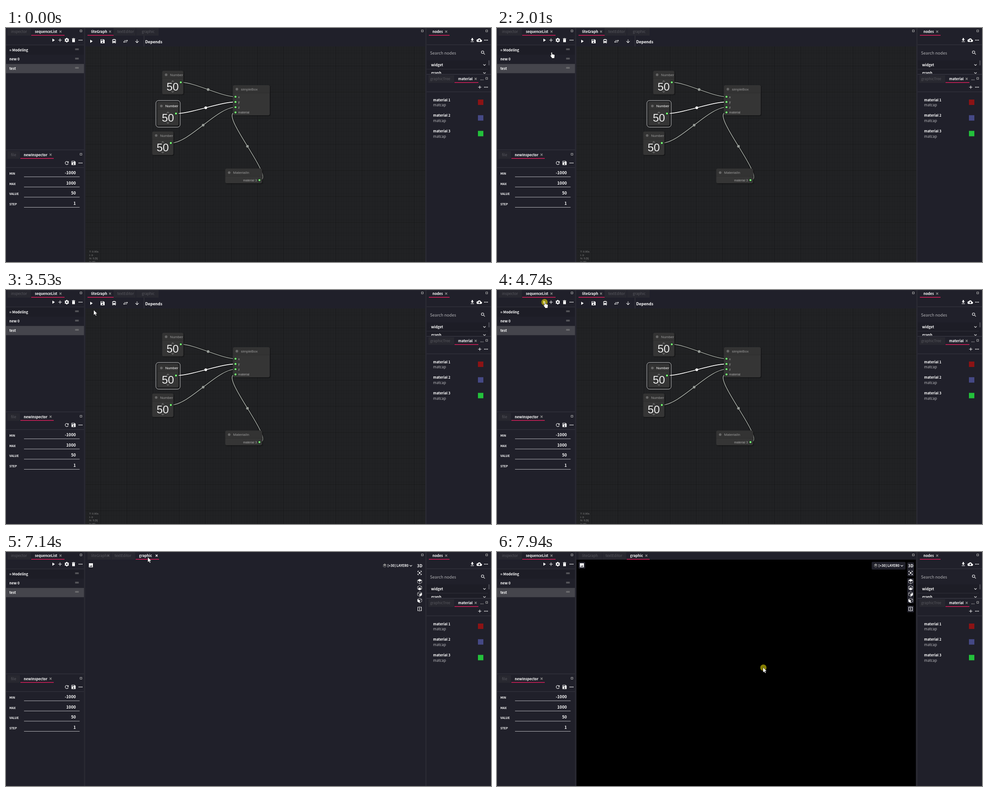
An HTML page with a canvas for the animation above (8 s loop, 1077 by 520 pixels).

```html
<!DOCTYPE html>
<html lang="en">
<head>
<meta charset="utf-8">
<title>Node editor</title>
<style>
html, body { margin: 0; width: 100%; height: 100%; overflow: hidden; background: #20202a; }
canvas { display: block; }
</style>
</head>
<body>
<canvas id="stage" width="1077" height="520"></canvas>
<script>
const ctx = document.getElementById('stage').getContext('2d');
const LOOP = 8000, SWITCH = 7080, LOADED = 7300;
const UI = '"Noto Sans CJK KR", "Noto Sans CJK JP", "Noto Sans CJK SC", "Noto Sans CJK", "Noto Sans", sans-serif';
const ARIAL = '"Liberation Sans", Arial, sans-serif';
const PANEL = '#20202a', TAB = '#282830', LINE = '#30303a', PINK = '#dc1e5c', DIM = '#58585e';
const K = 0.58; // graph units to pixels

const ICONS = {
  play: 'M8 5v14l11-7z',
  plus: 'M5 11h6V5h2v6h6v2h-6v6h-2v-6H5z',
  trash: 'M6 7h12v14H6zM5 4h4l1-1h4l1 1h4v2H5z',
  save: 'M3 3h14l4 4v14H3zM5 5h10v4H5zM9 16a3 3 0 1 0 6 0a3 3 0 1 0-6 0z',
  refresh: 'M17.6 6.4A8 8 0 1 0 19.7 14h-2.1A6 6 0 1 1 16.2 7.8L13 11h7V4z',
  search: 'M3 9.5a6.5 6.5 0 1 0 13 0a6.5 6.5 0 1 0-13 0zM5 9.5a4.5 4.5 0 1 0 9 0a4.5 4.5 0 1 0-9 0zM14 15.4l1.4-1.4 5 5-1.4 1.5z',
  down: 'M11 4h2v12l5.6-5.6L20 12l-8 8-8-8 1.4-1.4L11 16z',
  bus: 'M4 6q0-4 8-4t8 4v12l-2 3h-2v-2H8v2H6l-2-3zM6 6h12v5H6zM6 14h3v3H6zM15 14h3v3h-3z',
  swap: 'M6 11L2 15l4 4v-3h12v-2H6zM22 9l-4-4v3H6v2h12v3z',
  download: 'M9 3h6v6h4l-7 7-7-7h4zM5 18h14v2H5z',
  cloud: 'M6 20a6 6 0 0 1-.6-12A7.5 7.5 0 0 1 19.4 10A5 5 0 0 1 19 20zM17 13h-3V9h-4v4H7l5 5z',
  chevron: 'M6 10l1.4-1.4L12 13.2l4.6-4.6L18 10l-6 6z',
  image: 'M3 3h18v18H3zM5 18h14l-4.5-6-3.5 4.5-2.5-3z',
  drag: 'M4 9h16v2H4zM4 13h16v2H4z',
  dots: 'M3.500 12a2.200 2.200 0 1 0 4.400 0a2.200 2.200 0 1 0-4.400 0zM9.800 12a2.200 2.200 0 1 0 4.400 0a2.200 2.200 0 1 0-4.400 0zM16.100 12a2.200 2.200 0 1 0 4.400 0a2.200 2.200 0 1 0-4.400 0z',
  layers: 'M12 2l9 7-9 7-9-7zM3 13l9 7 9-7v3l-9 6-9-6z',
  focus: 'M3 3h6v2H5v4H3zM15 3h6v6h-2V5h-4zM3 15h2v4h4v2H3zM19 15h2v6h-6v-2h4zM8 12a4 4 0 1 0 8 0a4 4 0 1 0-8 0z',
  mirror: 'M11 1h2v22h-2zM3 3h6v2H5v14h4v2H3zM15 3h6v18h-6v-2h4V5h-4z'
};
for (const name in ICONS) ICONS[name] = new Path2D(ICONS[name]);
const ARROW = new Path2D('M0 0v17l4-4 3 6.500 2.500-1-3-6.500h5.500z');
const HAND = new Path2D('M4 1q1.500-1.500 3 0v6l7 1.500q2 .5 2 3l-1 7v2.500H6v-2L1 12.500q-.5-2 2-1.500l1 1z');

// pointer keys: time, x, y
const TRACK = [
  [810, 644, 489], [1230, 330, 187], [1380, 332, 187], [2010, 120, 54],
  [2160, 104, 63], [2340, 103, 84], [2800, 103, 84], [3040, 16, 94],
  [3160, 20, 92], [3530, 195, 45], [3590, 172, 31], [3900, 100, 7],
  [4100, 87, 20], [4430, 105, 27], [5870, 105, 27], [6170, 277, 92],
  [6400, 306, 60], [6620, 307, 21], [6680, 307, 21], [6900, 315, 12],
  [7300, 315, 12], [7860, 591, 257], [8000, 591, 257]
];
const CLICKS = [[4620, 5190], [6840, 7080], [7880, 8000]];

function box(x, y, w, h, color) {
  ctx.fillStyle = color;
  ctx.fillRect(x, y, w, h);
}

function text(s, x, y, size, color = '#fff', weight = 'bold', align = 'left', family = UI) {
  ctx.font = `${weight} ${size}px ${family}`;
  ctx.fillStyle = color;
  ctx.textAlign = align;
  ctx.fillText(s, x, y);
}

function icon(name, x, y, size = 12, color = '#fff') {
  ctx.save();
  ctx.translate(x - size / 2, y - size / 2);
  ctx.scale(size / 24, size / 24);
  ctx.fillStyle = color;
  ctx.fill(ICONS[name], 'evenodd');
  ctx.restore();
}

function disc(x, y, r, color) {
  ctx.beginPath();
  ctx.arc(x, y, r, 0, 7);
  ctx.fillStyle = color;
  ctx.fill();
}

function polygon(points, color) {
  ctx.beginPath();
  points.forEach(p => ctx.lineTo(...p));
  ctx.closePath();
  ctx.fillStyle = color;
  ctx.fill();
}

function gear(x, y) {
  ctx.strokeStyle = '#fff';
  ctx.lineWidth = 2.2;
  ctx.beginPath();
  ctx.arc(x, y, 2.8, 0, 7);
  ctx.stroke();
  for (let i = 0; i < 6; i++) {
    const a = i * Math.PI / 3 + Math.PI / 6, c = Math.cos(a), s = Math.sin(a);
    ctx.beginPath();
    ctx.moveTo(x + 3 * c, y + 3 * s);
    ctx.lineTo(x + 5 * c, y + 5 * s);
    ctx.stroke();
  }
}

function cross(x, y, color = '#888') {
  ctx.strokeStyle = color;
  ctx.lineWidth = 1.4;
  ctx.beginPath();
  ctx.moveTo(x - 2.2, y - 2.2);
  ctx.lineTo(x + 2.2, y + 2.2);
  ctx.moveTo(x + 2.2, y - 2.2);
  ctx.lineTo(x - 2.2, y + 2.2);
  ctx.stroke();
}

function maximize(x, y) {
  ctx.strokeStyle = '#aaa';
  ctx.lineWidth = 1;
  ctx.strokeRect(x - 2, y - 2, 4, 4);
}

function idleTab(label, x, w, textX, y = 0) {
  box(x, y, w, 17, TAB);
  text(label, textX, y + 11, 8.1, DIM, 'normal');
}

function activeTab(label, x, w, textX, closeX, y = 0, closeColor) {
  text(label, textX, y + 11, 7.75);
  cross(closeX, y + 8, closeColor);
  box(x, y + 15.5, w, 1.5, PINK);
}

function leftPanels() {
  idleTab('inspector', 3, 52, 11);
  activeTab('sequenceList', 56, 74, 64, 121);
  maximize(166.5, 6.500);
  icon('play', 105, 27);
  icon('plus', 120, 27, 13);
  gear(135, 27);
  icon('trash', 150, 27);
  icon('dots', 165.5, 27);
  box(0, 37, 173, 1.5, LINE);
  ['= Modeling', 'new 0', 'test'].forEach((label, i) => {
    const y = 38.5 + i * 20.7;
    box(0, y, 173, 20.5, ['#1d1d26', PANEL, '#45454c'][i]);
    text(label, 7.500, y + 13.2, 7.75);
    icon('drag', 157.5, y + 8.7, 12, '#888');
  });

  box(0, 270, 173, 1.5, LINE);
  idleTab('file', 3, 28, 11, 273.5);
  activeTab('newInspector', 32, 74, 39.5, 99, 273.5);
  maximize(166.5, 280.5);
  icon('refresh', 135, 300);
  icon('save', 150, 300);
  icon('dots', 165.5, 300);
  box(0, 309.5, 173, 1.5, LINE);
  [['MIN', '-1000'], ['MAX', '1000'], ['VALUE', '50'], ['STEP', '1']].forEach(([label, value], i) => {
    const y = 325 + i * 22.6;
    text(label, 7.500, y + 1, 6.600);
    text(value, 155, y, 9, '#fff', 'bold', 'right');
    box(40, y + 5.200, 123.5, 1, '#b4b4b8');
  });
  box(173, 0, 3, 520, '#292932');
}

function rightPanels() {
  box(931, 0, 3, 520, '#292932');
  activeTab('nodes', 939, 46, 947, 977.5);
  maximize(1067.5, 6.500);
  icon('download', 1035.5, 27);
  icon('cloud', 1051, 27);
  icon('dots', 1066, 27);
  box(934, 36.5, 143, 1.5, LINE);
  text('Search nodes', 941.5, 59, 9.28, '#b0b0b4', 'normal');
  icon('search', 1059.5, 55);
  box(934, 72, 140, 30, '#1d1d26');
  text('widget', 944, 85, 7.9);
  icon('chevron', 1062.5, 82);
  box(934, 91, 136, 1, LINE);
  ctx.save();
  ctx.beginPath();
  ctx.rect(934, 92, 140, 9.500);
  ctx.clip();
  text('graph', 944, 103, 7.9);
  icon('chevron', 1062.5, 100);
  ctx.restore();
  box(1071, 72, 3, 11, '#43434c');

  box(934, 102, 143, 2, LINE);
  idleTab('graphicTree', 938, 57, 942, 105);
  activeTab('material', 996, 53, 1004, 1043, 105);
  text('...', 1053, 116, 8, '#ccc');
  maximize(1067.5, 112);
  icon('plus', 1052, 131.5);
  icon('dots', 1066, 131.5);
  box(934, 141, 143, 1.5, LINE);
  ['#8c1315', '#454985', '#23c13b'].forEach((color, i) => {
    const y = 159 + i * 34.8;
    text('material ' + (i + 1), 948.5, y + 3.500, 7.700);
    text('matcap', 948.5, y + 15, 8.1, '#b8b8bc', 'normal');
    box(1048, y, 12, 12, color);
  });
}

function slot(x, y) {
  disc(x, y, 2.900, '#111');
  disc(x, y, 2.300, '#7f7');
}

function nodeFrame(label, x, y, w, h, selected) {
  const title = 30 * K;
  ctx.save();
  ctx.shadowColor = 'rgba(0,0,0,.5)';
  ctx.shadowBlur = 2;
  ctx.shadowOffsetX = ctx.shadowOffsetY = 1.2;
  ctx.beginPath();
  ctx.roundRect(x, y, w + K, title + h, 3.500);
  ctx.fillStyle = '#353535';
  ctx.fill();
  ctx.restore();
  ctx.beginPath();
  ctx.roundRect(x, y, w + K, title, [3.500, 3.500, 0, 0]);
  ctx.fillStyle = '#333';
  ctx.fill();
  box(x, y + title - 0.6, w + K, 0.6, 'rgba(0,0,0,.2)');
  if (selected) {
    ctx.beginPath();
    ctx.roundRect(x - 3.500, y - 3.500, w + 7.600, title + h + 7, 6);
    ctx.strokeStyle = 'rgba(255,255,255,.8)';
    ctx.lineWidth = 0.9;
    ctx.stroke();
  }
  disc(x + title / 2, y + title / 2, 2.900, '#666');
  text(label, x + title, y + 20 * K, 14 * K, selected ? '#fff' : '#999', 'normal', 'left', ARIAL);
}

function numberNode(x, y, selected) {
  const w = 80 * K, h = 60 * K, top = y + 30 * K, mid = x + w / 2;
  nodeFrame('Number', x, y, w, h, selected);
  for (const [tip, base] of [[.1, .2], [.9, .8]])
    polygon([[mid, top + h * tip], [mid + h * .1, top + h * base], [mid - h * .1, top + h * base]], '#666');
  text('50', mid, top + h * .75, h * .7, '#eee', 'normal', 'center', ARIAL);
  slot(x + w - 9 * K, top + 14 * K);
}

function link(x0, y0, x1, y1, color) {
  const bend = Math.hypot(x1 - x0, y1 - y0) / 4;
  ctx.beginPath();
  ctx.moveTo(x0, y0);
  ctx.bezierCurveTo(x0 + bend, y0, x1 - bend, y1, x1, y1);
  ctx.strokeStyle = 'rgba(0,0,0,.5)';
  ctx.lineWidth = 7 * K;
  ctx.stroke();
  ctx.strokeStyle = color;
  ctx.lineWidth = 3 * K;
  ctx.stroke();
  disc((x0 + x1) / 2, (y0 + y1) / 2, 5 * K, color);
}

function grid() {
  box(176.5, 41, 754.5, 479, '#212224');
  for (const [step, color] of [[5.8, 'rgba(0,0,0,.07)'], [58, 'rgba(0,0,0,.22)']]) {
    for (let x = 210 - Math.floor(33 / step) * step; x < 931; x += step) box(x, 41, 0.8, 479, color);
    for (let y = 84 - Math.floor(43 / step) * step; y < 520; y += step) box(176.5, y, 754.5, 0.8, color);
  }
}

function graphView(t) {
  activeTab('liteGraph', 181, 58, 189, 231);
  idleTab('textEditor', 239, 49, 247);
  idleTab('graphic', 289, 50, 301.5);
  ['play', 'save', 'bus', 'swap', 'down'].forEach((name, i) => icon(name, 189 + i * 25.5, 29.5));
  box(306, 17, 1, 24, '#3a3a43');
  text('Depends', 309, 33.5, 8.9);

  grid();
  const inX = 509.6, inY = i => 152.8 + i * 20 * K;
  link(388.1, 120.7, inX, inY(0), '#9a9f9a');
  link(377.5, 190.1, inX, inY(1), '#fff');
  link(366, 255.6, inX, inY(2), '#9a9f9a');
  link(562.8, 338.1, inX, inY(3), '#9a9f9a');
  numberNode(346.9, 95.2);
  numberNode(336.3, 164.6, true);
  numberNode(324.8, 230.1);
  nodeFrame('simpleBox', 504, 127.2, 81.2, 49.5);
  ['x', 'y', 'z', 'material'].forEach((label, i) => {
    slot(inX, inY(i));
    text(label, 515.6, inY(i) + 2.700, 12 * K, '#aaa', 'normal', 'left', ARIAL);
  });
  nodeFrame('MaterialIn', 486.9, 312.6, 81.2, 15);
  slot(562.8, 338.1);
  text('material 3', 557, 340.8, 12 * K, '#aaa', 'normal', 'right', ARIAL);

  const ran = t >= 5870;
  ['T: ' + (ran ? '635.57s' : '0.00s'), 'I: ' + (ran ? 1 : 0), 'N: 5 [5]', 'V: 87'].forEach((s, i) =>
    text(s, 185, 499.2 + i * 13 * K, 10 * K, '#888', 'normal', 'left', ARIAL));
}

function cube(x, y, face) {
  const r = 5.200, c = r * .9, h = r / 2;
  const faces = {
    top: [[x, y - r], [x + c, y - h], [x, y], [x - c, y - h]],
    bottom: [[x, y], [x + c, y + h], [x, y + r], [x - c, y + h]],
    right: [[x + c, y - h], [x + c, y + h], [x, y + r], [x, y]],
    left: [[x - c, y - h], [x - c, y + h], [x, y + r], [x, y]]
  };
  polygon(faces[face], '#fff');
  ctx.beginPath();
  [[x, y - r], [x + c, y - h], [x + c, y + h], [x, y + r], [x - c, y + h], [x - c, y - h]].forEach(p => ctx.lineTo(...p));
  ctx.closePath();
  ctx.moveTo(x - c, y - h);
  ctx.lineTo(x, y);
  ctx.lineTo(x + c, y - h);
  ctx.moveTo(x, y);
  ctx.lineTo(x, y + r);
  ctx.strokeStyle = '#ddd';
  ctx.lineWidth = 0.8;
  ctx.stroke();
}

function button(x, y, w, h) {
  ctx.beginPath();
  ctx.roundRect(x, y, w, h, 2);
  ctx.fillStyle = PANEL;
  ctx.fill();
}

function graphicView(t) {
  const loaded = t >= LOADED, moving = t >= 7370;
  idleTab('liteGraph', 181, 52, 189);
  if (!moving) cross(loaded ? 229 : 227, 8, DIM);
  idleTab('textEditor', 234, 53, 241);
  activeTab('graphic', 288, loaded ? 51 : 52, 295.5, loaded ? 331.7 : 334.5, 0, moving ? '#888' : '#eee');
  if (loaded) box(176.5, 17, 753.5, 503, '#000');
  button(181, 22, 15, 15);
  button(832, 22, 75, 17);
  button(911, 23, 15, 31);
  button(911, 58, 15, 56);
  button(911, 119, 15, 15);
  icon('image', 188.5, 29.5);
  icon('layers', 841, 30, 11, '#888');
  text('[+30] LAYER0', 847, 33, 7.300);
  icon('chevron', 899, 30.5);
  text('3D', 918.7, 34, 9, '#fff', 'bold', 'center');
  icon('focus', 918.5, 46.5);
  ['top', 'bottom', 'right', 'left'].forEach((face, i) => cube(918.6, 65.5 + i * 14, face));
  icon('mirror', 918.5, 126.5);
}

function pointerAt(t) {
  if (t >= 530 && t < 590) return [1067, 513];
  if (t < TRACK[0][0]) return null;
  const i = TRACK.findIndex(k => k[0] > t);
  const [t0, x0, y0] = TRACK[i - 1], [t1, x1, y1] = TRACK[i];
  const u = (t - t0) / (t1 - t0), e = u * u * (3 - 2 * u);
  return [x0 + (x1 - x0) * e, y0 + (y1 - y0) * e];
}

function pointer(t) {
  const at = pointerAt(t);
  if (!at) return;
  const [x, y] = at;
  if (CLICKS.some(([from, to]) => t >= from && t < to)) disc(x + .5, y, 7, 'rgba(255,240,0,.52)');
  const overList = x < 173 && y > 38 && y < 101;
  const overTools = x > 98 && x < 170 && y > 20 && y < 34;
  const hand = overList || overTools;
  ctx.save();
  ctx.translate(x - (hand ? 2 : 0), y);
  ctx.scale(.62, .62);
  ctx.lineWidth = 1.6;
  ctx.strokeStyle = '#000';
  ctx.fillStyle = '#fff';
  ctx.stroke(hand ? HAND : ARROW);
  ctx.fill(hand ? HAND : ARROW);
  ctx.restore();
}

function draw(t) {
  box(0, 0, 1077, 520, PANEL);
  if (t < SWITCH) graphView(t);
  else graphicView(t);
  maximize(924.5, 6.500);
  leftPanels();
  rightPanels();
  pointer(t);
}

const start = performance.now();
function tick() {
  draw((performance.now() - start) % LOOP);
  requestAnimationFrame(tick);
}
tick();
</script>
</body>
</html>
```
